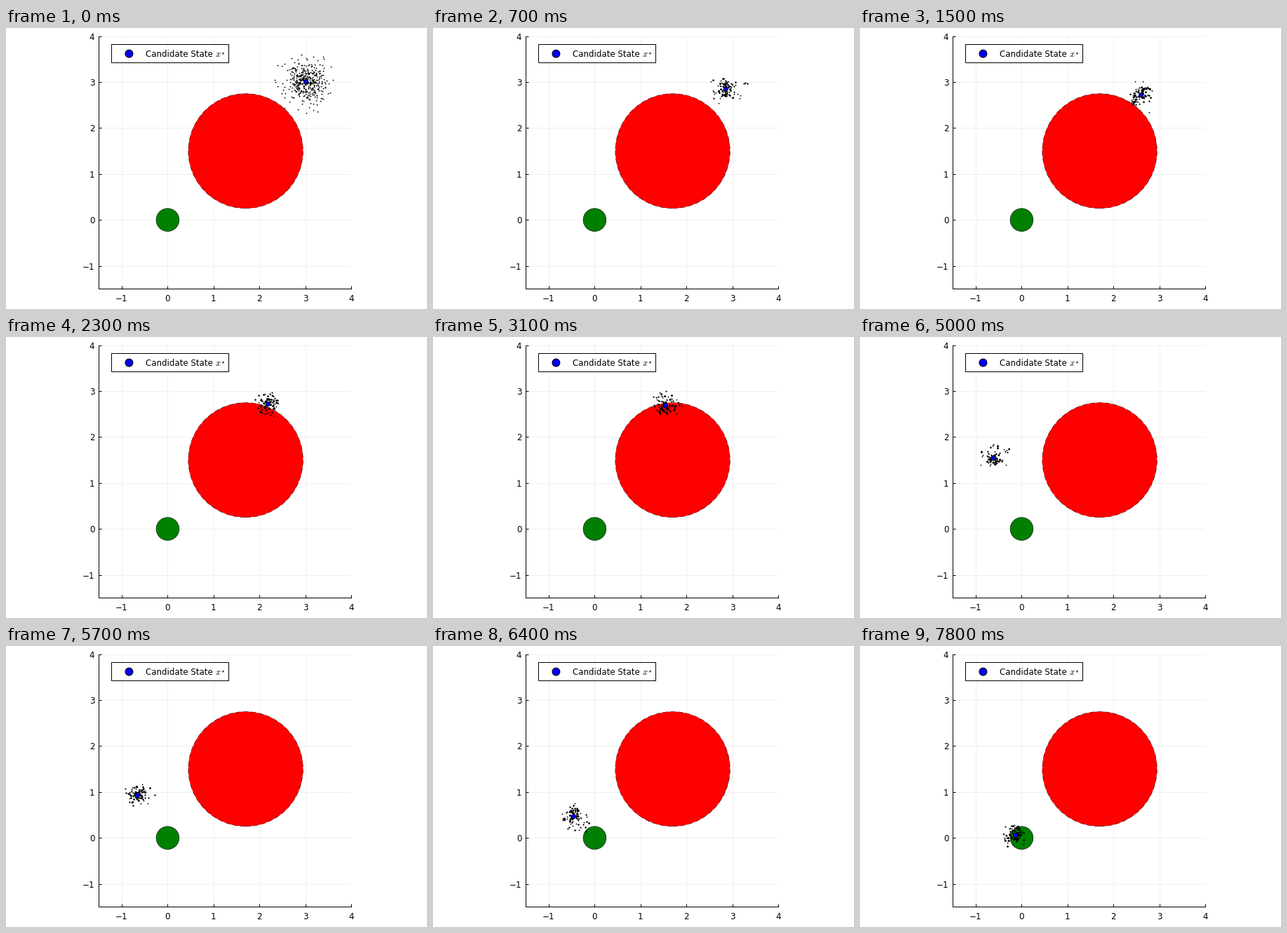
These frames come from a looping animation (600x400 px, 7.9 s). A matplotlib script:

```python
import numpy as np
import matplotlib.pyplot as plt
from matplotlib.animation import FuncAnimation
from matplotlib.patches import Circle, Rectangle

W, H, DPI = 600, 400, 100
FRAMES, STEP_MS = 79, 100
PARTICLES = 400
PT = 72 / DPI  # points per pixel

plt.rcParams["font.family"] = "DejaVu Sans"
plt.rcParams["mathtext.fontset"] = "cm"

# way points of the state estimate around the obstacle
TIMES = np.array([0, 15, 31, 42, 50, 64, 78])
POINTS = np.array([(3.01, 3.01), (2.60, 2.73), (1.54, 2.69), (0.10, 2.38),
                   (-0.63, 1.55), (-0.46, 0.47), (-0.15, 0.06)])
SLOPES = np.gradient(POINTS, TIMES, axis=0)


def estimate(t):
    """Smooth cubic path through the way points."""
    i = min(np.searchsorted(TIMES, t, side="right") - 1, len(TIMES) - 2)
    h = TIMES[i + 1] - TIMES[i]
    u = (t - TIMES[i]) / h
    v = 1 - u
    return (v * v * ((1 + 2 * u) * POINTS[i] + u * h * SLOPES[i])
            + u * u * ((1 + 2 * v) * POINTS[i + 1] - v * h * SLOPES[i + 1]))


def spread(t):
    return 0.105 + 0.115 * np.exp(-t / 3)


def simulate():
    """Particle clouds: diffuse, resample, then place on the path."""
    rng = np.random.default_rng(4)
    cloud = rng.normal(size=(PARTICLES, 2))
    clouds = []
    for t in range(FRAMES):
        if t:
            cloud = 0.9 * cloud + 0.5 * rng.normal(size=cloud.shape)
            weight = rng.exponential(size=PARTICLES) ** 3
            cloud = cloud[rng.choice(PARTICLES, PARTICLES, p=weight / weight.sum())]
        z = (cloud - cloud.mean(axis=0)) / cloud.std(axis=0)
        clouds.append(estimate(t) + spread(t) * z)
    return clouds


fig = plt.figure(figsize=(W / DPI, H / DPI), dpi=DPI, facecolor="white")
ax = fig.add_axes([132.3 / W, 28.8 / H, 359.7 / W, 359.5 / H])
ax.set(xlim=(-1.5, 4), ylim=(-1.5, 4),
       xticks=range(-1, 5), yticks=range(-1, 5))
ax.spines[["top", "right"]].set_visible(False)
ax.spines[["left", "bottom"]].set_linewidth(PT)
ax.set_axisbelow(True)
ax.grid(color="#f0f0f0", linewidth=PT)
ax.tick_params(direction="in", length=3.6 * PT, width=PT,
               labelsize=11.9 * PT, pad=6 * PT)
ax.tick_params(axis="x", pad=7.5 * PT)

ax.add_patch(Circle((1.7, 1.5), 1.25, facecolor="red", edgecolor="none", zorder=3))
ax.add_patch(Circle((1.7, 1.5), 1.25, fill=False, edgecolor="black",
                    linewidth=0.5 * PT, linestyle=(0, (14, 8)), zorder=3))
ax.add_patch(Circle((0, 0), 0.25, facecolor="green", edgecolor="black",
                    linewidth=0.6 * PT, zorder=3))

dots = ax.scatter([], [], s=(1.8 * PT) ** 2, color="black",
                  linewidths=0, zorder=4, clip_on=False)
state = ax.scatter([], [], s=(6.2 * PT) ** 2, facecolor="blue",
                   edgecolor="black", linewidths=0.8 * PT, zorder=5)

# legend in pixel coordinates
key = fig.add_axes([0, 0, 1, 1])
key.set(xlim=(0, W), ylim=(H, 0))
key.axis("off")
key.add_patch(Rectangle((150, 23), 167, 26, facecolor="white",
                        edgecolor="black", linewidth=PT))
key.add_patch(Circle((175.4, 36.6), 5.4, facecolor="blue",
                     edgecolor="black", linewidth=1.1 * PT))
key.text(198.6, 41, "Candidate State", fontsize=11.8 * PT, va="baseline")
key.text(298, 41, "$x$", fontsize=12.5 * PT, va="baseline")
key.text(305.6, 38.2, r"$\star$", fontsize=7 * PT, va="baseline")

clouds = simulate()


def draw(t):
    dots.set_offsets(clouds[t])
    state.set_offsets([estimate(t)])
    return dots, state


anim = FuncAnimation(fig, draw, frames=FRAMES, interval=STEP_MS,
                     repeat=True, repeat_delay=0)
plt.show()
```
